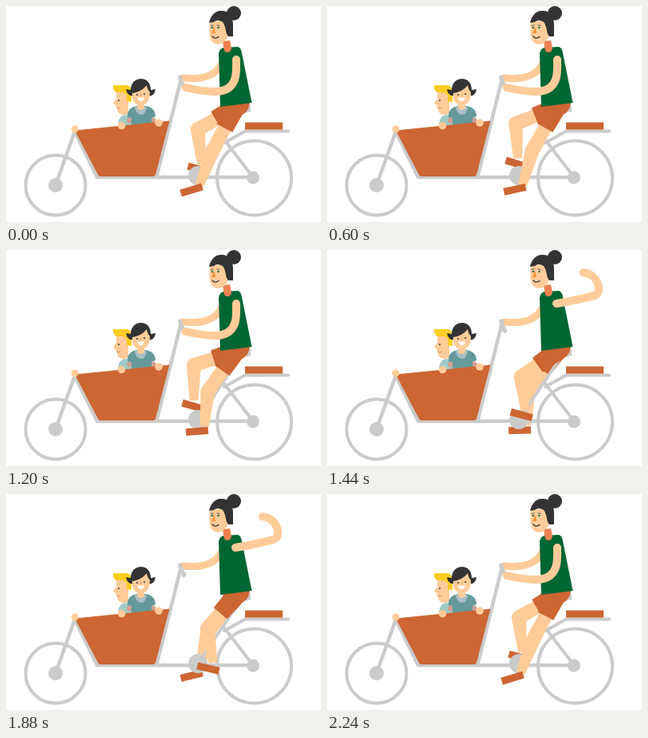
An HTML page with a canvas that plays this animation: 394 px wide and 270 px high, repeating every 2280 ms.

```html
<!DOCTYPE html>
<html lang="en">
<head>
<meta charset="utf-8">
<title>Cargo bike ride</title>
<style>
html, body { margin: 0; width: 100%; height: 100%; overflow: hidden; background: #fff; }
canvas { display: block; }
</style>
</head>
<body>
<canvas id="stage" width="394" height="270"></canvas>
<script>
const c = document.getElementById('stage').getContext('2d');
const GREY = '#cbcbcb', RUST = '#cc6633', SKIN = '#ffcc99', GREEN = '#006633',
      DARK = '#333335', TEAL = '#669999', PALE = '#9fcac8', BLOND = '#ffcc22';
const LOOP = 2280, STEP = 40, TURN = 560, FAR_SHIFT = 340;
const HIP = [287, 127];

// time, knee x y, ankle x y, shoe x y, shoe angle in degrees
const PEDAL = [
  [0,   258, 182, 242, 224, 232, 230, -17],
  [90,  252, 176, 249, 220, 240, 226, -3],
  [200, 252, 168, 259, 211, 253, 218, 13],
  [300, 247, 163, 251, 202, 246, 208, 16],
  [330, 241, 156, 246, 199, 242, 205, 15],
  [420, 235, 144, 235, 188, 234, 195, 16],
  [520, 245, 163, 242, 214, 233, 222, -8]
];

// two joined Bezier segments from shoulder to hand
const REST = [288, 67, 288, 80, 291, 102, 268, 106.5, 254, 108.5, 238, 105, 225, 102];
const BENT = [287, 67.5, 297, 68, 308, 68, 318, 66, 326, 63, 324, 45, 310, 41];
const OUT  = [287, 67, 305, 64, 323, 60, 336, 56.5, 346, 51, 338, 29, 321, 28];
const WAVE = [[1200, REST], [1420, OUT], [1640, BENT], [1900, OUT], [2200, REST]];

function fill(d, color) {
  c.fillStyle = color;
  c.fill(new Path2D(d));
}

function line(d, color, width) {
  c.strokeStyle = color;
  c.lineWidth = width;
  c.lineCap = c.lineJoin = 'round';
  c.stroke(new Path2D(d));
}

function dot(x, y, r, color) {
  c.fillStyle = color;
  c.beginPath();
  c.arc(x, y, r, 0, 7);
  c.fill();
}

function ring(x, y, r, width) {
  c.strokeStyle = GREY;
  c.lineWidth = width;
  c.beginPath();
  c.arc(x, y, r, 0, 7);
  c.stroke();
}

function taper([x1, y1], [x2, y2], r1, r2, color, flat) {
  const a = Math.atan2(y2 - y1, x2 - x1), s = Math.sin(a), k = Math.cos(a);
  c.fillStyle = color;
  c.beginPath();
  c.moveTo(x1 + s * r1, y1 - k * r1);
  c.lineTo(x2 + s * r2, y2 - k * r2);
  c.lineTo(x2 - s * r2, y2 + k * r2);
  c.lineTo(x1 - s * r1, y1 + k * r1);
  c.fill();
  dot(x1, y1, r1, color);
  if (!flat) dot(x2, y2, r2, color);
}

// smooth periodic interpolation of the pedal poses
function pedalPose(time) {
  const t = time % TURN, n = PEDAL.length;
  const key = i => {
    const k = PEDAL[(i + n) % n].slice();
    k[0] += Math.floor(i / n) * TURN;
    return k;
  };
  let i = n - 1;
  while (PEDAL[i][0] > t) i--;
  const [p, a, b, q] = [key(i - 1), key(i), key(i + 1), key(i + 2)];
  const span = b[0] - a[0], u = (t - a[0]) / span;
  return a.map((v, j) => {
    const m = (b[j] - p[j]) / (b[0] - p[0]) * span;
    const w = (q[j] - v) / (q[0] - a[0]) * span;
    return v + u * m + u * u * (3 * (b[j] - v) - 2 * m - w)
      + u * u * u * (2 * (v - b[j]) + m + w);
  });
}

function leg(time) {
  const [, kx, ky, ax, ay, sx, sy, angle] = pedalPose(time);
  const knee = [kx, ky], len = Math.hypot(kx - HIP[0], ky - HIP[1]);
  const hem = HIP.map((v, i) => v + (knee[i] - v) * 29 / len);
  taper(hem, knee, 8.5, 9, SKIN);
  taper(knee, [ax, ay], 9, 5.5, SKIN, true);
  c.save();
  c.translate(sx, sy);
  c.rotate(angle * Math.PI / 180);
  c.fillStyle = RUST;
  c.fillRect(-14, -4.5, 28, 9);
  c.restore();
  taper(HIP, hem, 12, 11, RUST, true);
}

function armPose(t) {
  if (t <= WAVE[0][0] || t >= WAVE[WAVE.length - 1][0]) return REST;
  const i = WAVE.findIndex(w => w[0] > t), [t0, a] = WAVE[i - 1], [t1, b] = WAVE[i];
  const u = (1 - Math.cos(Math.PI * (t - t0) / (t1 - t0))) / 2;
  return a.map((v, j) => v + (b[j] - v) * u);
}

function nearArm(t) {
  const p = armPose(t);
  line(`M${p.slice(0, 2)}C${p.slice(2, 8)} ${p.slice(8)}`, SKIN, 10);
}

function wheels() {
  ring(62, 224, 37.5, 4);
  ring(310.5, 215, 46.5, 4);
  dot(62, 224, 9, GREY);
  dot(309, 214.5, 8, GREY);
}

function frame() {
  line('M62 224L86 157L114 214H309', GREY, 4.5);
  line('M272 166L309 214M295 130L241 211M353 156.5H299L273 171', GREY, 4);
  line('M188.5 213L218.5 93', GREY, 4.5);
  dot(240, 212, 12, GREY);
  fill('M296 125H306V132L297 134Z', GREY);
  fill('M299 145.5H346V154.5H299Z', RUST);
}

function boy() {
  fill('M140 150C140 141 144 136 150 136L158 138V151Z', PALE);
  fill('M138 107H153V134Q146 139 140 133L138 126L134 121L138 116Z', SKIN);
  fill('M134 99H152Q157 101 157 107V120L151 119V111L147 108H138Q133 105 134 99Z', BLOND);
  dot(141, 118, 1, DARK);
  line('M139 127Q141 129 143 127', '#e78250', 1);
}

function girl() {
  dot(154.5, 143, 3.5, '#cf9f90');
  dot(184, 143, 3.5, '#cf9f90');
  fill('M157 151V140L152 139C151 130 157 126 164 125H174C183 126 187 131 187 138L182 140V149Z', TEAL);
  fill('M161 126H176Q175 136 168.5 136Q162 135 161 126Z', '#a8bfc4');
  fill('M164 118H173V128Q168.5 132 164 128Z', SKIN);
  fill('M150 104L156 105C156 95 163 91 169 91C176 91 181 96 181 105L187 104C186 111 182 113 178 112H159C155 113 151 110 150 104Z', DARK);
  fill('M158 109Q170 107 176 99Q177 105 180 108C180 118 176 124 169 124C161 124 157 118 158 109Z', SKIN);
  dot(164, 111, 1, DARK);
  dot(173, 110, 1, DARK);
  fill('M164 114.5H173Q172 119 168.5 119Q165 119 164 114.5Z', '#fff');
  line('M168.5 110V112.5', '#ee9c66', 1);
}

function basket() {
  fill('M86 155.5L204.5 143.5L187 211Q186 213 184 213H118Q116 213 115 211Z', RUST);
  dot(86, 154, 4.5, SKIN);
  dot(144.5, 149.5, 4.8, SKIN);
  dot(191, 146, 4.8, SKIN);
}

function head() {
  fill('M271 44L280 43L282 53Q281 58 276.5 58Q272 57 272 50Z', '#ee8150');
  fill('M255 19C254 30 254 38 257 44Q260 48 266 48Q275 46 278 37L280 18Z', SKIN);
  dot(285, 9, 9, DARK);
  fill('M254 21C256 11 263 5 270 6C279 6 284 13 284 24V38H278C274 34 276 27 271 20Q264 16 260 20Z', DARK);
  dot(258, 27, 1.3, '#24734b');
  dot(265.5, 27, 1.3, '#24734b');
  line('M256 24.5L259 24M264 24L267 24.5', DARK, 0.8);
  fill('M260.5 26L257 34H262Z', '#f59335');
  line('M258 38Q261.5 42 266 38.5', DARK, 1.3);
}

function torso() {
  fill('M270 124L305 120Q305 129 297 135L280 140Z', RUST);
  fill('M266 60Q267 53 272 52L290 51Q294 52 295 59L307.5 121L268 126Z', GREEN);
}

function draw(t) {
  c.clearRect(0, 0, 394, 270);
  wheels();
  leg(t + FAR_SHIFT);
  frame();
  boy();
  girl();
  basket();
  line('M270 72C263 85 250 93 222 90', SKIN, 9);
  line('M218 89L219 95L222.5 101', GREY, 5.5);
  leg(t);
  torso();
  head();
  nearArm(t);
}

const start = performance.now();
function tick() {
  const t = (performance.now() - start) % LOOP;
  draw(Math.floor(t / STEP) * STEP);
  requestAnimationFrame(tick);
}
tick();
</script>
</body>
</html>
```
